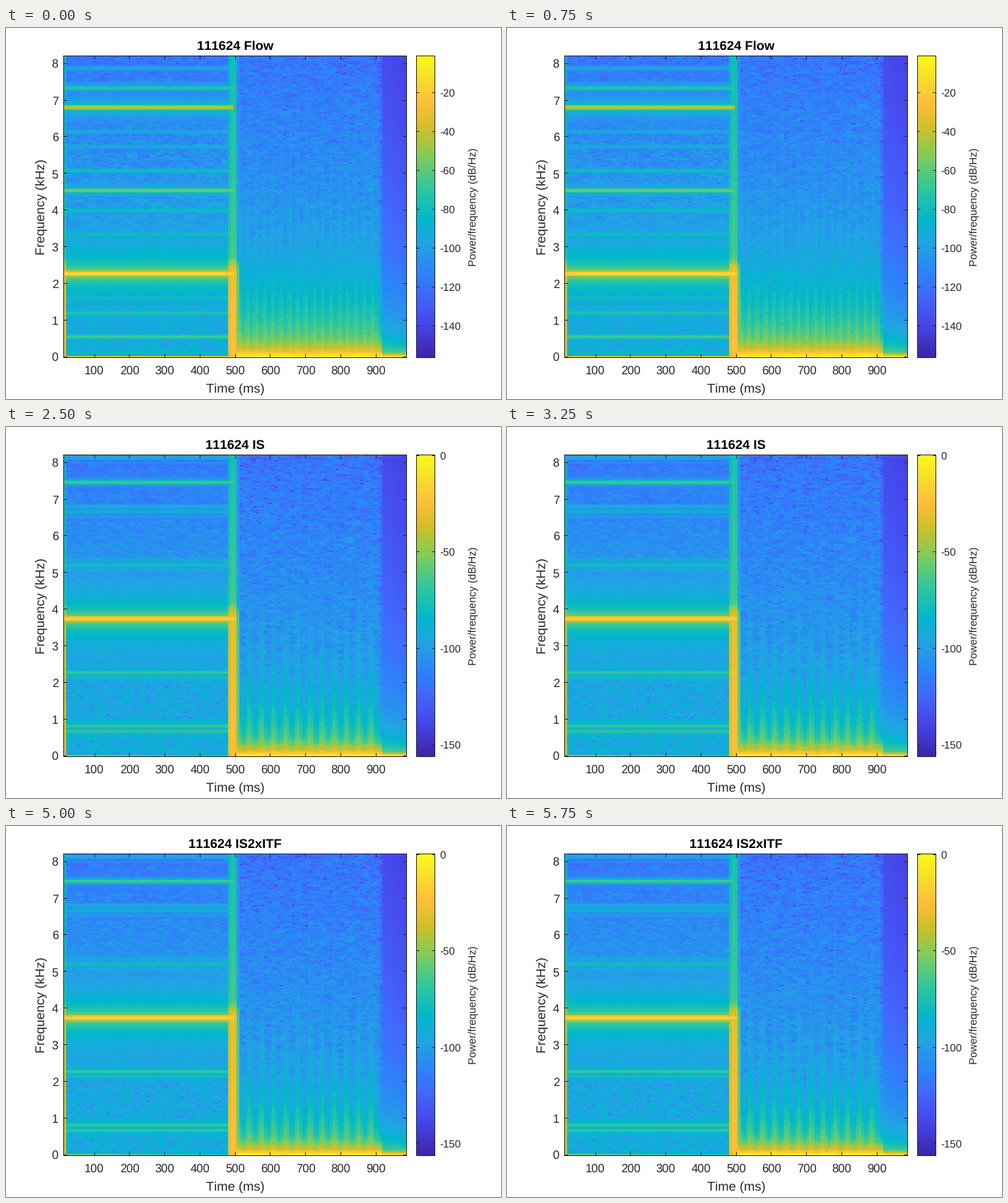
Animation, 700 px wide and 525 px high, one loop 6250 ms. Source, as a matplotlib script:

```python
import numpy as np
import matplotlib.pyplot as plt
from matplotlib.animation import FuncAnimation
from matplotlib.colors import LinearSegmentedColormap

W, H, DPI = 700, 525, 100
FS, NFFT, HOP = 16384, 512, 128
COLS, ROWS = 125, NFFT // 2 + 1
LEFT, RIGHT, TOP, BOTTOM = 81.5, 566.5, 39.5, 466.5
CB_L, CB_R = 580.5, 606.5
FLOOR = -156.3
GREY = "#262626"

plt.rcParams.update({
    "font.family": "Liberation Sans",
    "axes.unicode_minus": False,
    "text.hinting": "no_hinting",
    "text.kerning_factor": 12,  # switches kerning off
})

STOPS = {0: "#3E26A8", 7: "#4747EB", 13: "#4269FE", 17: "#2F81FA",
         24: "#20A5E3", 29: "#01B8CA", 36: "#37C897", 42: "#81CC59",
         48: "#D1BF27", 53: "#FEBE3C", 58: "#F7DC2A", 63: "#F9FB15"}
cmap = LinearSegmentedColormap.from_list(
    "parula", [(i / 63, c) for i, c in STOPS.items()], N=256)

STEP = FS / NFFT / 1000
freq = np.arange(ROWS) * STEP
safe = np.maximum(freq, STEP / 2)

# first columns of the click, the airflow and the silence
CLICK, FLOW, SILENCE = 60, 63, 116


def power(db):
    return 10 ** (np.asarray(db) / 10)


def noise(seed):
    """Relative power of white noise in overlapping Hamming windows."""
    x = np.random.default_rng(seed).normal(size=FS)
    seg = np.stack([x[k * HOP:k * HOP + NFFT] for k in range(COLS)])
    p = np.abs(np.fft.rfft(seg * np.hamming(NFFT))) ** 2
    return (p / p.mean()).T


def line(f, level):
    """Spectral line: main lobe plus a skirt."""
    u = np.abs(freq - f) / STEP
    return power(level) * (power(-6 * u ** 2)
                           + power(-22) * np.maximum(u, 2) ** -4.2)


def harmonics(tone, strong):
    """Odd harmonics folded at the Nyquist limit; strong ones override."""
    total = 0
    fs = FS / 1000
    for n in sorted(set(range(3, 37, 2)) | set(strong)):
        f = abs((n * tone + fs / 2) % fs - fs / 2)
        total = total + line(f, strong.get(n, -57 - .8 * n - 3.4 * f))
    return total


def sweep(tone, low, high):
    """Level low up to the tone, then a drop to high with a gentle slope."""
    s = 1 / (1 + np.exp(-(freq - tone - .3) / .06))
    return ((low - 2 * freq) * (1 - s)
            + (high - 2.8 * (freq - tone)) * s)


def spectrogram(seed, tone, strong, attack, flow, gap, beat, dc):
    rnd = noise(seed)
    p = np.zeros((ROWS, COLS))

    hum = power(-90 - 1.5 * freq - .22 * freq ** 2)
    p[:, :CLICK] = hum[:, None] * rnd[:, :CLICK]
    p[:, :FLOW - 1] += (line(tone, -15) + harmonics(tone, strong))[:, None]
    p[:, FLOW - 1] += line(tone, -20)
    p[0, :CLICK] += power(dc[0] - dc[1] * np.arange(CLICK))
    p[:, 0] += power(sweep(tone, attack, -74))

    click = sweep(tone, -23, -62)
    for k, drop in enumerate((8, 0, 2, 32), CLICK):
        p[:, k] += power(click - drop) * rnd[:, k] ** .08

    hiss = power(-96.5 - 1.6 * freq - .11 * freq ** 2)
    leak = np.minimum(flow - 43 * np.log10(safe) - 3 * freq, -6)
    period, phase = beat
    weight = np.clip(freq / .5, 0, 1)
    for k in range(FLOW, SILENCE):
        trough = .5 - .5 * np.cos(2 * np.pi * (k - phase) / period)
        fade = weight * (20 if k == SILENCE - 1 else 0)
        p[:, k] += hiss * rnd[:, k] * power(-.4 * fade)
        p[:, k] += power(leak - gap * trough * weight - fade) \
            * rnd[:, k] ** .25

    # silence: only a small offset leaks upward
    tail = power(-122 - 28 * np.log10(safe / .5)) + line(0, -16)
    for k in range(SILENCE, COLS):
        p[:, k] = tail * power(.6 * (SILENCE + 4 - k) * weight)
    return 10 * np.log10(p + 2.2e-16)


def low_clip():
    return spectrogram(1, 2.264, {2: -59, 3: -43, 4: -73}, attack=-32,
                       flow=-63, gap=10, beat=(3.03, 63.6), dc=(-38, 0))


def high_clip(seed, attack, phase, dc):
    return spectrogram(seed, 3.73, {2: -66}, attack, flow=-67, gap=18,
                       beat=(4.42, phase), dc=dc)


gt = high_clip(2, -72, 68.4, (-48, .7))
is1 = high_clip(3, -36, 67.2, (-55, .4))
is2 = high_clip(4, -36, 68, (-34, .9))

# title, decibels, colour limit, colour bar step
CLIPS = [("111624 Flow", low_clip(), -1.1, 20), ("111624 GT", gt, .5, 50),
         ("111624 IS", is1, .4, 50), ("111624 IS2", is2, .1, 50),
         ("111624 IS2xITF", is1, .4, 50)]

fig = plt.figure(figsize=(W / DPI, H / DPI), dpi=DPI, facecolor="white")
ax = fig.add_axes([0, 0, 1, 1])


def text(x, y, s, px, **kw):
    kw = {"color": GREY, "ha": "center", "va": "baseline", **kw}
    ax.text(x, y, s, fontsize=px * 72 / DPI, **kw)


def rule(xs, ys):
    ax.plot(xs, ys, color=GREY, lw=72 / DPI, snap=False,
            solid_capstyle="butt", solid_joinstyle="miter", zorder=5)


def frame(x0, x1):
    rule([x0, x1, x1, x0, x0], [TOP, TOP, BOTTOM, BOTTOM, TOP])


def side_ticks(x0, x1, y, size):
    y = np.floor(y) + .5
    rule([x0, x0 + size], [y, y])
    rule([x1, x1 - size], [y, y])


def draw(i):
    title, db, high, step = CLIPS[i]
    ax.clear()
    ax.axis("off")
    opts = dict(cmap=cmap, aspect="auto", interpolation="nearest")
    ax.imshow(db, origin="lower", vmin=FLOOR, vmax=high,
              extent=(81, 567, BOTTOM, TOP), **opts)
    ax.imshow(np.linspace(1, 0, 256)[:, None],
              extent=(CB_L, CB_R, BOTTOM, TOP), **opts)
    ax.set_xlim(0, W)
    ax.set_ylim(H, 0)
    frame(LEFT, RIGHT)
    frame(CB_L, CB_R)

    for ms in range(100, 1000, 100):
        x = 75.3 + .4975 * ms
        tick = np.floor(x) + .5
        rule([tick, tick], [BOTTOM, BOTTOM - 5])
        rule([tick, tick], [TOP, TOP + 5])
        text(x, 491, str(ms), 16.67)
    for khz in range(9):
        y = BOTTOM - .8 - 51.95 * khz
        side_ticks(LEFT, RIGHT, y, 5)
        text(74, y + 6.5, str(khz), 16.67, ha="right")
    for v in range(0, -157, -step):
        if v <= high:
            y = TOP + (high - v) / (high - FLOOR) * (BOTTOM - TOP)
            side_ticks(CB_L, CB_R, y, 4)
            text(613, y + 5.5, str(v), 15, ha="left")

    text(324, 31, title, 18.33, color="black", weight="bold")
    text(324, 515, "Time (ms)", 18.33)
    side = dict(rotation=90, rotation_mode="anchor")
    text(54, 253, "Frequency (kHz)", 18.33, **side)
    text(665, 253, "Power/frequency (dB/Hz)", 15, **side)
    return []


anim = FuncAnimation(fig, draw, frames=len(CLIPS), init_func=lambda: [],
                     interval=1250, repeat=True, repeat_delay=0)
plt.show()
```
